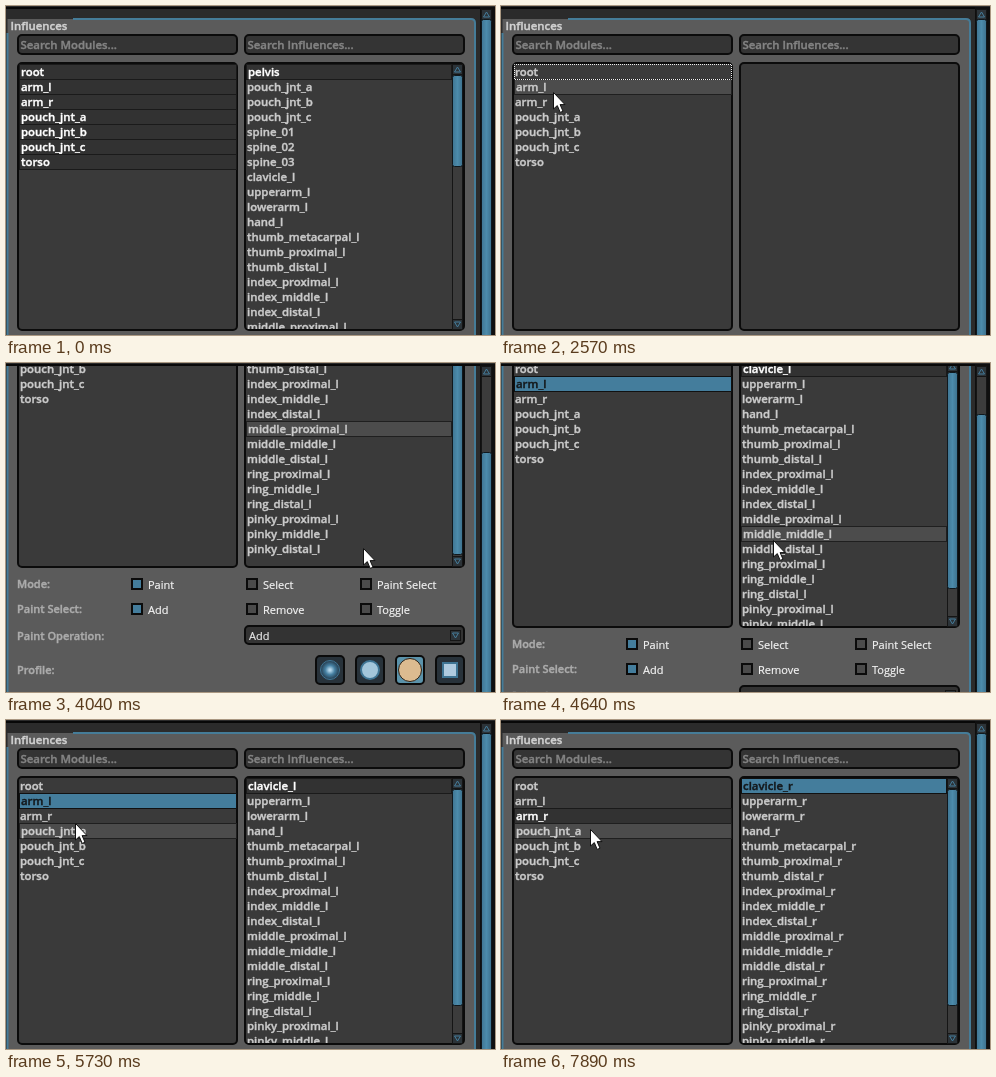
Write an HTML page that moves like this. It is 489x329 px and loops after 8 s.

```html
<!DOCTYPE html>
<html lang="en">
<head>
<meta charset="utf-8">
<title>Influences</title>
<style>
html, body { margin: 0; width: 100%; height: 100%; overflow: hidden; background: #2b2b2b; }
svg { display: block; width: 489px; height: 329px; }
text { font: 600 11.4px "Open Sans", "Noto Sans", sans-serif; white-space: pre; stroke-width: .4px; }
.small { font-size: 11px; }
.option { font-size: 11px; font-weight: 400; stroke-width: .2px; }
</style>
</head>
<body>
<svg id="stage" viewBox="0 0 489 329"></svg>
<script>
const LOOP = 8000, STEP = 120, ROW = 15, TOP = 58, PAGE = 17;
const BLUE = '#447d9c';

const modules = ['root', 'arm_l', 'arm_r', 'pouch_jnt_a', 'pouch_jnt_b', 'pouch_jnt_c', 'torso'];
const arm = side => [
  'clavicle', 'upperarm', 'lowerarm', 'hand', 'thumb_metacarpal', 'thumb_proximal', 'thumb_distal',
  ...['index', 'middle', 'ring', 'pinky'].flatMap(f => ['proximal', 'middle', 'distal'].map(p => f + '_' + p))
].map(name => name + '_' + side);
const armL = arm('l'), armR = arm('r');
const everything = ['pelvis', ...modules.slice(3, 6), 'spine_01', 'spine_02', 'spine_03', ...armL, ...armR];

// Pointer legs: start time, number of steps, end point
const legs = [
  [370, 4, 67, 200], [1970, 6, 52, 86], [3560, 3, 357, 185], [4160, 2, 352, 181],
  [4400, 7, 165, 172], [5250, 5, 69, 103], [5850, 2, 66, 95], [6210, 6, 462, 150],
  [6930, 4, 290, 66], [7410, 3, 451, 157], [7770, 2, 89, 109]
];

function pointer(t) {
  let x = -4, y = 293;
  for (const [start, steps, x1, y1] of legs) {
    if (t < start) break;
    const k = Math.min(1, (Math.floor((t - start) / STEP) + 1) / steps);
    x += (x1 - x) * k;
    y += (y1 - y) * k;
  }
  return { x: Math.round(x), y: Math.round(y) };
}

// Latest value whose time has come
const at = (t, pairs) => pairs.filter(p => p[0] <= t).pop()[1];

function stateAt(t) {
  const scroll = at(t, [[0, 0], [3920, 120], [4640, 60], [5370, 0]]);
  return {
    scroll,
    hoverScroll: t >= 3920 && t < 4160 ? 0 : scroll, // hover waits for the pointer to move
    inner: at(t, [[0, 0], [3800, 2], [4520, 0]]),
    focus: at(t, [[0, ''], [1230, 'left'], [7290, 'right']]),
    picked: at(t, [[0, [0, 1, 2, 3, 4, 5, 6]], [1350, []], [2940, [1]], [6090, [2]]]),
    list: at(t, [[0, everything], [1350, []], [2940, armL], [6090, armR]]),
    cursor: t >= 370 ? pointer(t) : null
  };
}

const rect = (x, y, w, h, fill, extra = '') =>
  `<rect x="${x}" y="${y}" width="${w}" height="${h}" fill="${fill}" ${extra}/>`;
const label = (x, y, s, fill, cls = '') =>
  `<text x="${x}" y="${y}" fill="${fill}" stroke="${fill}" class="${cls}">${s}</text>`;
const path = (d, fill, stroke = 'none', extra = '') => `<path d="${d}" fill="${fill}" stroke="${stroke}" ${extra}/>`;
const circle = (x, y, r, fill, extra = '') => `<circle cx="${x}" cy="${y}" r="${r}" fill="${fill}" ${extra}/>`;
const box = (x, y, w, h, fill, r = 4) =>
  rect(x + 1, y + 1, w - 2, h - 2, fill, `rx="${r}" stroke="#0b0b0b" stroke-width="2"`);

function arrow(x, y, dir) {
  const a = y + 5.5 + 2.5 * dir, b = y + 5.5 - 2.5 * dir;
  return rect(x + .5, y + .5, 10, 10, '#2c3338', 'stroke="#151515"') +
    path(`M${x + 2.5} ${b}h6L${x + 5.5} ${a}z`, 'none', BLUE);
}

function handle(x, y, h) {
  return rect(x + .5, y + .5, 10, h - 1, 'url(#bar)', 'rx="2" stroke="#10181d"');
}

const track = (x, y, h) => rect(x + .5, y + .5, 10, h - 1, '#3c3c3c', 'stroke="#151515"');

const ROW_STYLE = {
  plain: { text: '#cbcbcb' },
  hover: { fill: '#4c4c4c', line: '#1f1f1f', text: '#cbcbcb' },
  idle: { fill: '#323232', line: '#1a1a1a', text: '#fff' },
  active: { fill: BLUE, line: '#111', text: '#14191c' }
};

function row(x, y, w, name, kind) {
  const s = ROW_STYLE[kind], boxed = kind !== 'plain';
  return (boxed ? rect(x + .5, y + .5, w, ROW, s.fill, `stroke="${s.line}"`) : '') +
    label(x + (boxed ? 2 : 1), y + 12, name, s.text);
}

function rows(x, w, names, first, picked, focused, hover) {
  let plain = '', boxed = '';
  names.slice(first, first + PAGE + 1).forEach((name, i) => {
    const n = i + first;
    const kind = picked.includes(n) ? (focused ? 'active' : 'idle') : n === hover ? 'hover' : 'plain';
    const out = row(x, TOP + ROW * i, w, name, kind);
    if (kind === 'plain') plain += out; else boxed += out;
  });
  return `<g clip-path="url(#view)">${boxed}${plain}</g>`;
}

const dotted = (x, y, w, color) =>
  rect(x + .5, y + .5, w, ROW, 'none', `stroke="${color}" stroke-dasharray="1 1" stroke-dashoffset=".5"`);

function hovered(s, x, w, count, first) {
  const c = s.cursor;
  if (!c || c.x < x || c.x > x + w) return -1;
  const y = c.y + s.hoverScroll - TOP;
  const n = Math.floor(y / ROW);
  return y >= 0 && y < 265 && n + first < count ? n + first : -1;
}

function lists(s) {
  const leftFocus = s.focus === 'left', rightFocus = s.focus === 'right';
  let out = box(11, 28, 221, 21, '#343434') + box(238, 28, 221, 21, '#343434') +
    label(14.5, 43, 'Search Modules...', '#848484') + label(241.5, 43, 'Search Influences...', '#848484') +
    box(11, 56, 221, 269, '#3a3a3a') + box(238, 56, 221, 269, '#3a3a3a') +
    rows(13, 217, modules, 0, s.picked, leftFocus, hovered(s, 13, 217, modules.length, 0));

  if (s.picked.length > 1 && leftFocus) out += path('M13.5 58V73M230.5 58V73', 'none', '#b8764f');
  else if (!s.picked.length) out += dotted(13, TOP, 217, '#f0f0f0');

  const count = s.list.length;
  if (count) {
    const room = 243, size = Math.round(room * PAGE / count);
    out += rows(240, 205, s.list, s.inner, [0], rightFocus, hovered(s, 240, 205, count, s.inner)) +
      track(446, 58, 265) + arrow(446, 58, -1) + arrow(446, 313, 1) +
      handle(446, 69 + Math.round((room - size) * s.inner / (count - PAGE)), size);
  }
  return out;
}

function options(y, title, names) {
  return label(11, y + 4, title, '#acacac', 'small') + names.map((name, i) => {
    const x = [125, 240, 354][i];
    return rect(x + 1, y - 5, 10, 10, i ? '#4b4b4b' : BLUE, 'stroke="#0b0b0b" stroke-width="2"') +
      label(x + 17, y + 5, name, '#f4f4f4', 'option');
  }).join('');
}

function settings() {
  const tile = (x, fill) => box(x, 412, 30, 30, fill);
  const dark = '#28323a';
  return options(341, 'Mode:', ['Paint', 'Select', 'Paint Select']) +
    options(366, 'Paint Select:', ['Add', 'Remove', 'Toggle']) +
    label(11, 397, 'Paint Operation:', '#acacac', 'small') +
    box(238, 382, 221, 20, '#333') + label(243, 397, 'Add', '#e6e6e6', 'option') + arrow(444, 387, 1) +
    label(11, 431, 'Profile:', '#acacac', 'small') +
    tile(309, dark) + circle(324, 427, 9.5, 'url(#soft)', 'stroke="#3f7594"') +
    tile(349, dark) + circle(364, 427, 9, '#a3c6da', 'stroke="#3f7594" stroke-width="2"') +
    tile(389, '#5b93ab') + circle(404, 427, 11.5, '#dcbb90', 'stroke="#2a2119"') +
    tile(429, dark) + rect(437, 420, 14, 14, '#afcbdf', 'stroke="#3f7594" stroke-width="2"');
}

const DEFS = `<defs>
  <linearGradient id="bar"><stop stop-color="#3f7592"/><stop offset=".5" stop-color="#4c8bab"/><stop offset="1" stop-color="#3d718d"/></linearGradient>
  <radialGradient id="soft"><stop offset=".1" stop-color="#b4d6ea"/><stop offset=".5" stop-color="#4580a2"/><stop offset="1" stop-color="#24394a"/></radialGradient>
  <clipPath id="view"><rect x="12" y="58" width="446" height="265"/></clipPath>
  <clipPath id="page"><rect y="3" width="474" height="326"/></clipPath>
</defs>`;

function draw(t) {
  const s = stateAt(t);
  const panel = path('M1.5 480V13H465q4 0 4 4V480z', '#5b5b5b') +
    path('M1.5 480V27M67 13H465q4 0 4 4V480', 'none', '#457c98', 'stroke-width="2"') +
    label(4.5, 24, 'Influences', '#d2d2d2');
  let out = DEFS + rect(0, 0, 489, 329, '#2b2b2b') +
    `<g clip-path="url(#page)"><g transform="translate(0 ${-s.scroll})">${panel}${lists(s)}${settings()}</g></g>` +
    rect(0, 1, 489, 2, '#080808') + rect(474, 1, 15, 328, '#0f0f0f') + track(475, 3, 340) +
    arrow(475, 3, -1) + handle(475, 13 + Math.round(s.scroll * .63), 400);
  if (s.cursor) {
    out += `<g transform="translate(${s.cursor.x} ${s.cursor.y})">` +
      path('M.5 .5V17L4.3 13.6L7.2 20.4L10 19.2L7.1 12.6H12z', '#fff', '#111') + '</g>';
  }
  return out;
}

const stage = document.getElementById('stage');
const origin = performance.now();
let shown = '';
function tick() {
  const svg = draw((performance.now() - origin) % LOOP);
  if (svg !== shown) stage.innerHTML = shown = svg;
  requestAnimationFrame(tick);
}
tick();
</script>
</body>
</html>
```
